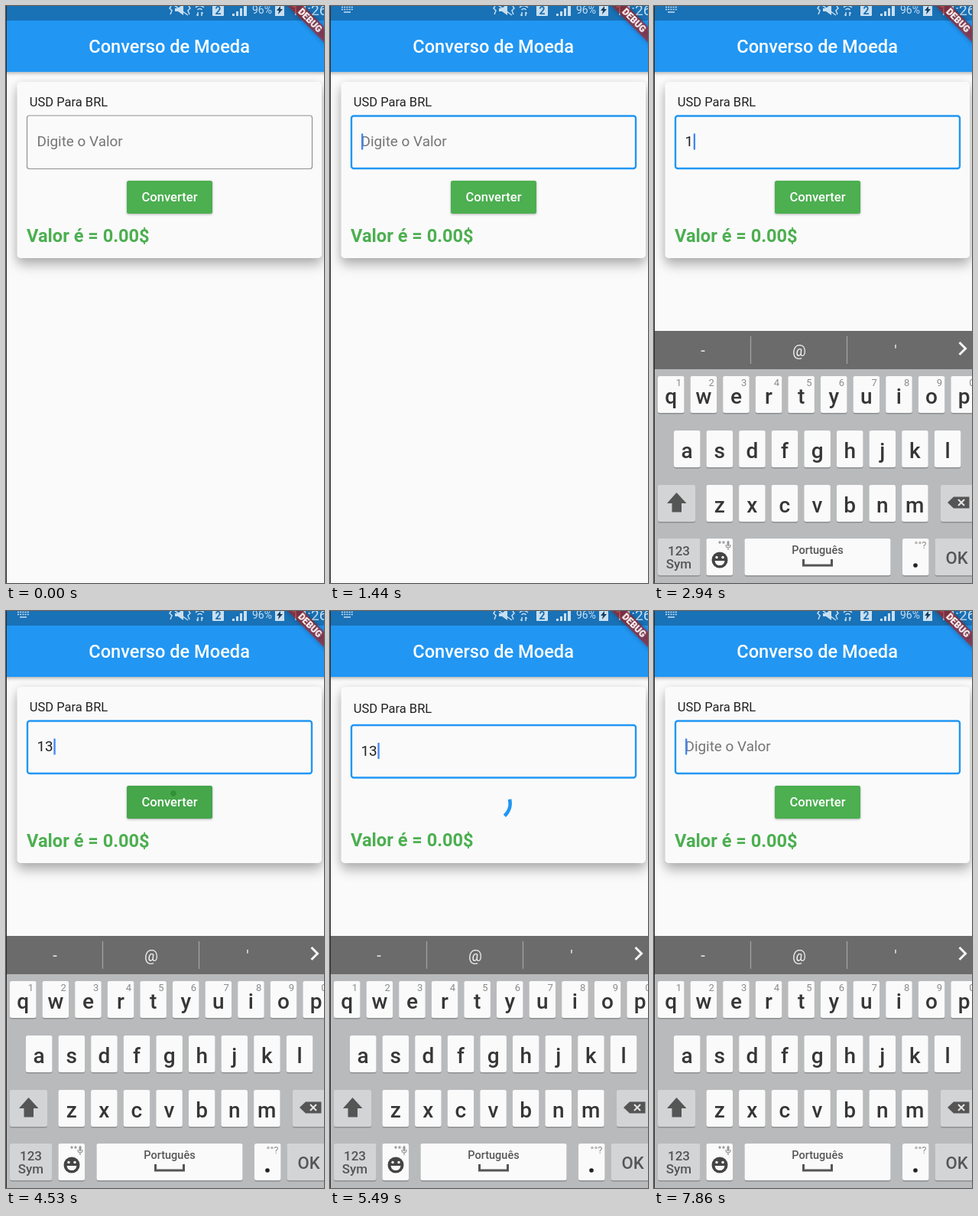
Write an HTML page that moves like this. It is 416 px wide and 753 px high and loops after 8000 ms.

```html
<!DOCTYPE html>
<html lang="pt">
<head>
<meta charset="utf-8">
<title>Converso de Moeda</title>
<style>
  html, body { margin: 0; width: 100%; height: 100%; overflow: hidden; background: #fafafa; }
  svg { display: block; width: 416px; height: 753px; font-family: Roboto, sans-serif; }
  .medium { font-weight: 500; }
  .mid { text-anchor: middle; }
  .bar { filter: drop-shadow(0 2px 2px rgba(0,0,0,.28)); }
  .card { fill: #fafafa; filter: drop-shadow(0 9px 8px rgba(0,0,0,.22)) drop-shadow(0 3px 6px rgba(0,0,0,.14)); }
  .button { fill: #4caf50; filter: drop-shadow(0 1.5px 1.5px rgba(0,0,0,.3)); }
  .status { fill: #c9dff0; stroke: none; }
  .line { fill: none; stroke: #c9dff0; stroke-width: 1.5; }
  .banner { filter: drop-shadow(0 0 3px rgba(0,0,0,.45)); }
  .key { fill: #fafafa; }
  .key.gray { fill: #d3d4d6; }
  .shade { fill: #8e9092; }
  .letter { font-size: 28px; font-weight: 500; fill: #363636; text-anchor: middle; }
  .small { font-size: 13px; fill: #8b8b8b; text-anchor: middle; }
  .dark { fill: #555; }
</style>
</head>
<body>
<svg viewBox="0 0 416 753">
  <defs><clipPath id="buttonClip"><rect x="158" y="228" width="112" height="43" rx="2.5"/></clipPath></defs>
  <rect width="416" height="753" fill="#fafafa"/>
  <rect class="bar" x="-10" y="-10" width="446" height="96" fill="#2196f3"/>
  <rect width="416" height="19" fill="#1971b6"/>
  <text class="medium mid" x="213.6" y="61" font-size="23.6" fill="#fff">Converso de Moeda</text>

  <g class="status">
    <g id="imeIcon">
      <path class="line" d="M15 1.5h15M15 4.5h15" stroke-dasharray="2 1.2"/>
      <path class="line" d="M18 8h9"/>
    </g>
    <g class="line">
      <path d="M216 0l-2 3 3 3-2 5M239 0l2 3-3 3 2 5M220 -1L238 12"/>
      <path d="M248 2q5-5 11 0M250.500 5q3-3 6 0"/>
      <path d="M251 8v5M249.500 11l1.500 2M256 13v-5M257.500 10l-1.500-2"/>
    </g>
    <path d="M221 3h4l7-6v15l-7-5h-4z"/>
    <rect x="270" y="-2" width="15" height="15" rx="1"/>
    <text class="mid" x="277.500" y="10.500" font-size="14" font-weight="700" fill="#1971b6">2</text>
    <path d="M296 13v-3h3v3zM301 13v-6h3v6zM306 13v-10h3v10zM311 13v-15h4v15z"/>
    <text x="322" y="10" font-size="14">96%</text>
    <rect x="352" y="-2" width="12" height="15"/>
    <path d="M359 0l-5 6h3l-1 5 6-7h-3z" fill="#173f62"/>
    <text x="373" y="11.500" font-size="19">14:26</text>
  </g>

  <rect class="card" x="14.500" y="99" width="398.500" height="230" rx="4.700"/>
  <text id="label" x="30.800" y="131" font-size="16.500" fill="#212121">USD Para BRL</text>
  <g id="field">
    <rect id="idle" x="27.500" y="143" width="373" height="69.500" rx="3" fill="none" stroke="#919191" stroke-width="1.200"/>
    <rect id="focus" x="28" y="143.500" width="372" height="68.500" rx="3" fill="none" stroke="#2196f3" stroke-width="2.400"/>
    <text id="hint" x="40.500" y="183" font-size="18.900" fill="#757575">Digite o Valor</text>
    <text id="value" x="40.500" y="183" font-size="18.900" fill="#212121"></text>
    <rect id="cursor" y="166.500" width="2.300" height="21" fill="#4285f4"/>
  </g>
  <g id="button">
    <rect class="button" x="158" y="228" width="112" height="43" rx="2.500"/>
    <g clip-path="url(#buttonClip)">
      <rect id="press" x="158" y="228" width="112" height="43" fill="#1b701f"/>
      <circle id="ripple" cx="219" cy="238" fill="#2c8a31" opacity=".75"/>
    </g>
    <text class="medium mid" x="214" y="255" font-size="16.600" fill="#fff">Converter</text>
  </g>
  <path id="spinner" fill="none" stroke="#2196f3" stroke-width="4.700"/>
  <text id="result" x="27" y="308" font-size="23.600" font-weight="700" fill="#4caf50"></text>

  <g class="banner" transform="translate(426 -9.400) rotate(45)">
    <rect x="-47" y="33" width="94" height="14.200" fill="#b71c1c" fill-opacity=".63"/>
    <text class="mid" x="0" y="44.400" font-size="12" font-weight="900" fill="#fff">DEBUG</text>
  </g>

  <g id="keyboard">
    <rect y="424" width="416" height="329" fill="#b9babc"/>
    <rect y="424" width="416" height="50" fill="#6b6b6b"/>
    <path d="M126.500 431v36M252.500 431v36" stroke="#a3a3a3" stroke-width="1.300"/>
    <g class="mid" font-size="20" fill="#f0f0f0">
      <text x="64" y="456">-</text><text x="190" y="457">@</text><text x="316" y="457">'</text>
    </g>
    <path d="M399.500 439l8 8-8 8" fill="none" stroke="#f4f4f4" stroke-width="3"/>
    <g id="keys"></g>
    <path class="dark" d="M29.500 635L42.500 649H36V660.500H23.500V649H17z"/>
    <path class="dark" d="M384 648l8-7.500h20.500v15H392z"/>
    <path d="M398 644l8 8M406 644l-8 8" stroke="#e6e6e6" stroke-width="2"/>
    <g class="mid medium dark">
      <g font-size="17"><text x="32.500" y="717">123</text><text x="32.500" y="733.500">Sym</text></g>
      <text x="396" y="727.500" font-size="22">OK</text>
      <text x="214" y="715" font-size="14.500">Português</text>
    </g>
    <path d="M195.500 722v8h37v-8" fill="none" stroke="#555" stroke-width="3"/>
    <circle cx="86" cy="723" r="10.500" fill="#444"/>
    <circle cx="82" cy="719.500" r="1.700" fill="#fafafa"/>
    <circle cx="90" cy="719.500" r="1.700" fill="#fafafa"/>
    <path d="M79.500 724h13q-1 6-6.500 6t-6.500-6z" fill="#fafafa"/>
    <g fill="none" stroke="#999" stroke-width="1.300">
      <circle cx="86" cy="700" r="1"/><circle cx="91" cy="700" r="1"/>
      <path d="M94 703q0 4 3 4t3-4M97 707v3"/>
    </g>
    <rect x="95.500" y="698" width="3" height="7" rx="1.500" fill="#999"/>
    <circle cx="342" cy="730" r="2.800" fill="#222"/>
    <text class="small" x="348.500" y="708">°°?</text>
  </g>
  <rect width="1" height="753" fill="#2b2b2b"/>
</svg>
<script>
const LOOP = 8000, PITCH = 42.6;
const $ = id => document.getElementById(id);
const ramp = (t, a, b) => Math.min(1, Math.max(0, (t - a) / (b - a)));
const within = (t, a, b) => t >= a && t < b;
const show = (id, on) => $(id).setAttribute('opacity', +on);

function key(x, y, w, gray) {
  const box = (cls, dy) => `<rect class="${cls}" x="${x}" y="${y + dy}" width="${w}" height="48" rx="2.5"/>`;
  return box('shade', 1.5) + box(gray ? 'key gray' : 'key', 0);
}

function letterRow(letters, x, y, digits) {
  return [...letters].map((c, i) => {
    const left = x + i * PITCH;
    return key(left, y, 34.5) +
      `<text class="letter" x="${left + 17.2}" y="${y + 35.5}">${c}</text>` +
      (digits ? `<text class="small" x="${left + 27.5}" y="${y + 12.5}">${(i + 1) % 10}</text>` : '');
  }).join('');
}

$('keys').innerHTML =
  letterRow('qwertyuiop', 5, 483, true) +
  letterRow('asdfghjkl', 26, 554) +
  letterRow('zxcvbnm', 68.5, 625) +
  key(5, 625, 49, true) + key(375, 625, 49, true) +
  key(5, 695, 55.5, true) + key(68.5, 695, 34.5) + key(118.5, 695, 191) +
  key(325, 695, 34.5) + key(367.5, 695, 57, true);

// cubic-bezier(.4, 0, .2, 1), solved by bisection
function ease(x) {
  let lo = 0, hi = 1, u = .5;
  for (let i = 0; i < 18; i++) {
    u = (lo + hi) / 2;
    const bx = 1.2 * u * (1 - u) ** 2 + .6 * u * u * (1 - u) + u ** 3;
    if (bx < x) lo = u; else hi = u;
  }
  return 3 * u * u * (1 - u) + u ** 3;
}

// Material indeterminate progress arc
function spinnerPath(ms) {
  const p = ms / 1333 % 1, turn = ms / 2222 % 1;
  const head = ease(ramp(p, 0, .5)), tail = ease(ramp(p, .5, 1));
  const sweep = Math.max((head - tail) * 1.5 * Math.PI, .001);
  const from = Math.PI * (-.5 + tail * 1.5 + turn * 2 + p * .5);
  const point = a => `${214 + 21.6 * Math.cos(a)} ${251 + 21.6 * Math.sin(a)}`;
  return `M${point(from)}A21.6 21.6 0 ${+(sweep > Math.PI)} 1 ${point(from + sweep)}`;
}

const cursorOn = [[900, 1920], [2070, 2460], [2940, 3570], [4050, 4560],
                  [5040, 5520], [5550, 5940], [6720, 7380], [7860, LOOP]];

function draw(t) {
  const text = within(t, 2070, 3180) ? '1' : within(t, 3180, 6990) ? '13' : '';
  const loading = within(t, 4575, 5550);
  const focus = ramp(t, 900, 1080);

  show('imeIcon', t >= 1200);
  $('idle').setAttribute('opacity', 1 - focus);
  $('focus').setAttribute('opacity', focus);
  $('hint').setAttribute('opacity', t < 6000 ? 1 - ramp(t, 2050, 2200) : ramp(t, 6970, 7170));
  $('value').textContent = text;
  $('cursor').setAttribute('x', 41 + text.length * 10.7);
  show('cursor', cursorOn.some(([a, b]) => within(t, a, b)));

  $('label').setAttribute('y', loading ? 133 : 131);
  $('field').setAttribute('transform', `translate(0 ${loading ? 5.5 : 0})`);
  $('result').setAttribute('y', loading ? 306.5 : 308);
  $('result').textContent = `Valor é = ${within(t, 5550, 6990) ? '70.83' : '0.00'}$`;

  show('button', !loading);
  $('press').setAttribute('opacity', t < 5000 ? .13 * ramp(t, 4460, 4530) : 0);
  $('ripple').setAttribute('r', within(t, 4500, 4575) ? (t - 4500) * .12 : 0);
  show('spinner', loading);
  if (loading) $('spinner').setAttribute('d', spinnerPath(t - 4495));

  const rise = ramp(t, 1450, 1525);
  $('keyboard').setAttribute('opacity', rise);
  $('keyboard').setAttribute('transform', `translate(0 ${40 * (1 - rise)})`);
}

const start = performance.now();
function tick() {
  draw((performance.now() - start) % LOOP);
  requestAnimationFrame(tick);
}
tick();
</script>
</body>
</html>
```
